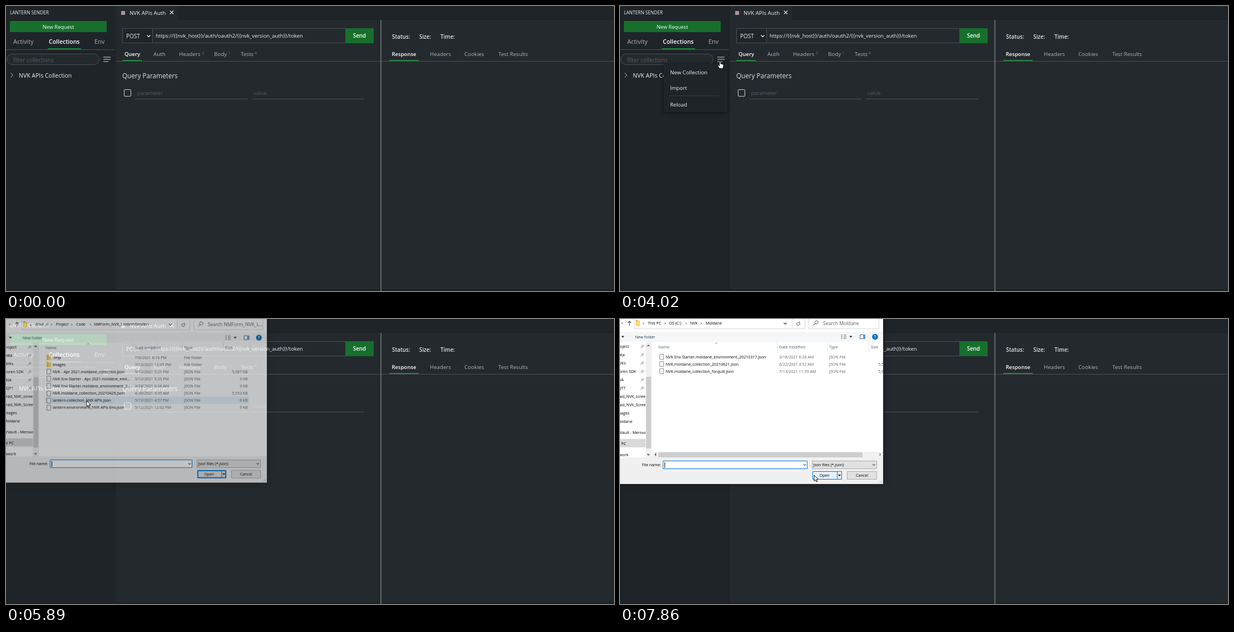
Animation of 1093x513 px, one loop 8 s. Source, as an HTML page with a canvas:

```html
<!DOCTYPE html>
<html lang="en">
<head>
<meta charset="utf-8">
<title>API client import</title>
<style>
html, body { margin: 0; width: 100%; height: 100%; overflow: hidden; background: #24292e; }
canvas { display: block; }
</style>
</head>
<body>
<canvas id="stage" width="1093" height="513"></canvas>
<script>
const LOOP = 8000, PAD = 20;
const FONT = '"Open Sans", "Noto Sans", sans-serif';
const GREEN = '#176f2c', BRIGHT = '#1f8038', LINE = '#4b5054', DIM = '#b0b4b7', LIGHT = '#f0f2f4', HINT = '#585d62';
const INK = '#000', NAVY = '#1e395b', GREY = '#606060', BLUE = '#0078d7';
const stage = document.getElementById('stage').getContext('2d');
const sheet = document.createElement('canvas');
sheet.width = 520; sheet.height = 340;
const dialog = sheet.getContext('2d');
dialog.translate(PAD, PAD);
let c = stage;

function rect(x, y, w, h, fill) {
  c.fillStyle = fill;
  c.fillRect(x, y, w, h);
}
function box(x, y, w, h, stroke, fill, r = 0) {
  c.beginPath();
  c.roundRect(x + .5, y + .5, w - 1, h - 1, r);
  if (fill) { c.fillStyle = fill; c.fill(); }
  c.lineWidth = 1;
  c.strokeStyle = stroke;
  c.stroke();
}
function clip(x, y, w, h) {
  c.save();
  c.beginPath();
  c.rect(x, y, w, h);
  c.clip();
}
// y is the vertical middle of the lowercase letters
function text(s, x, y, size, color, weight = 400, align = 'left') {
  c.font = `${weight} ${size}px ${FONT}`;
  c.textAlign = align;
  c.fillStyle = color;
  c.fillText(s, x, y + size * .36);
}
function path(d, color, width = 1, x = 0, y = 0, fill) {
  c.save();
  c.translate(x, y);
  const p = new Path2D(d);
  if (fill) { c.fillStyle = fill; c.fill(p); }
  c.strokeStyle = color;
  c.lineWidth = width;
  c.lineJoin = 'round';
  c.stroke(p);
  c.restore();
}
const down = (x, y, color, s = 3) => path(`M${-s} ${-s / 2}L0 ${s / 2}L${s} ${-s / 2}`, color, 1.2, x, y);
const right = (x, y, color, s = 1.5) => path(`M${-s / 2} ${-s}L${s / 2} 0L${-s / 2} ${s}`, color, 1, x, y);
const caret = (x, y) => path('M-2.5-1.2H2.5L0 1.5Z', '#222', .3, x, y, '#222');

function drawPage() {
  rect(0, 0, 1093, 513, '#24292e');
  rect(0, 0, 197, 513, '#1f2428');
  rect(309, 0, 784, 25, '#1f2428');
  rect(196, 0, 1, 513, '#1b1f23');
  rect(309, 24, 784, 1, '#1b1f23');
  rect(0, 510, 1093, 3, '#1d2125');

  text('LANTERN SENDER', 7, 12, 8.3, LIGHT);
  rect(7, 27, 174, 20, GREEN);
  text('New Request', 94, 37.3, 9.2, '#fff', 400, 'center');
  text('Activity', 13, 64, 11, DIM);
  text('Collections', 77, 64, 10.5, '#fff', 600);
  text('Env', 159, 64, 11, DIM);
  rect(0, 78, 196, 1, LINE);
  rect(75, 76, 60, 2, BRIGHT);
  box(1, 86, 167, 20, LINE, '#24292e', 10);
  text('filter collections', 13, 97, 9.9, HINT);
  path('M0 0H13M0 4H13M0 8H9', '#d5d8da', 1.2, 175, 92);
  right(10.5, 124.5, '#c5c8ca', 4);
  text('NVK APIs Collection', 23, 125.3, 10.5, LIGHT);

  rect(207, 9, 7, 7, '#a5979c');
  text('NVK APIs Auth', 222, 12.3, 9.75, LIGHT);
  path('M-3.2-3.2L3.2 3.2M3.2-3.2L-3.2 3.2', LIGHT, 1.2, 298, 11.5);

  box(209, 40, 55, 27, LINE, '#1f2428');
  box(263, 40, 348, 27, LINE);
  text('POST', 216, 54, 10, LIGHT);
  down(256.5, 54, LIGHT);
  text('https://{{nvk_host}}/auth/oauth2/{{nvk_version_auth}}/token', 269, 54, 9.4, LIGHT, 500);
  rect(610, 40, 51, 27, GREEN);
  text('Send', 635.5, 53.2, 9.9, '#fff', 600, 'center');

  rect(197, 99, 896, 1, LINE);
  text('Query', 213, 86.3, 9.5, '#fff', 600);
  [['Auth', 265], ['Headers', 311, 2, 352], ['Body', 374, 1, 399], ['Tests', 422, 4, 446.5]].forEach(([s, x, n, nx]) => {
    text(s, x, 86.3, 9.8, DIM);
    if (n) text(n, nx, 84.3, 8, '#2b9a48');
  });
  rect(209, 97, 35, 2, BRIGHT);
  text('Query Parameters', 209, 125.3, 11.7, '#dcdfe1');
  box(212, 150, 13, 13, '#d0d3d5', null, 1.5);
  text('parameter', 235.5, 156.5, 9.5, HINT);
  text('value', 445, 156.5, 9.5, HINT);
  rect(232, 167, 202, 1, LINE);
  rect(442, 167, 202, 1, LINE);

  rect(673, 25, 2, 488, '#63676a');
  [['Status:', 694], ['Size:', 743], ['Time:', 781]].forEach(([s, x]) => text(s, x, 55, 9.8, '#e2e5e7', 600));
  text('Response', 693.5, 86.3, 9.5, '#fff', 600);
  [['Headers', 762], ['Cookies', 824], ['Test Results', 885]].forEach(([s, x]) => text(s, x, 86.3, 9.7, DIM));
  rect(689, 97, 53, 2, BRIGHT);
}

function drawMenu(alpha) {
  c.save();
  c.globalAlpha = alpha;
  c.shadowColor = 'rgba(0,0,0,.5)';
  c.shadowBlur = 7;
  c.shadowOffsetY = 1;
  c.beginPath();
  c.roundRect(78, 104, 115, 87, 3);
  c.fillStyle = '#1f2428';
  c.fill();
  c.shadowColor = 'transparent';
  text('New Collection', 90, 119.5, 9.7, LIGHT);
  text('Import', 90, 147.3, 9.5, LIGHT);
  text('Reload', 90, 177.5, 9.5, LIGHT);
  rect(90, 161, 88, 1, '#353a3f');
  c.restore();
}

function drawTip(s, x, y, w) {
  box(x, y, w, 20, '#c8c8c8', '#fff');
  text(s, x + w / 2, y + 10, 8.9, '#555', 400, 'center');
}

// rows: name, date, size in KB; folders have no size
const HOME = {
  crumbs: [['drive_d', 50], ['Project', 88], ['Code', 125], ['NMForm_NVK_LanternSender', 157]],
  arrows: [80, 117, 151, 257], search: 'Search NMForm_NVK_L...',
  cols: [69, 232, 322, 397], sizeEnd: 438, sort: 147,
  rows: [
    ['.tmp', '7/6/2021 6:10 PM'], ['images', '7/13/2021 12:05 PM'],
    ['NVK - Apr 2021.moldane_collection.json', '5/12/2021 5:21 PM', '5,587'],
    ['NVK Env Starter - Apr 2021.moldane_envi...', '5/12/2021 5:25 PM', '3'],
    ['NVK Env Starter.moldane_environment_2...', '3/18/2021 6:26 AM', '3'],
    ['NVK.moldane_collection_20210429.json', '4/30/2021 4:35 AM', '5,553'],
    ['lantern-collection_NVK APIs.json', '5/12/2021 4:57 PM', '6'],
    ['lantern-environment_NVK APIs Env.json', '5/12/2021 12:02 PM', '5']
  ]
};
const NEXT = {
  crumbs: [['This PC', 50], ['OS (C:)', 88], ['NVK', 126], ['Moldane', 154]],
  arrows: [42, 81, 119, 146], search: 'Search Moldane',
  cols: [69, 286, 376, 451], sizeEnd: 493, sort: 173, scroll: true,
  rows: [
    ['NVK Env Starter.moldane_environment_20210317.json', '3/18/2021 6:26 AM', '3'],
    ['NVK.moldane_collection_20210621.json', '6/22/2021 3:52 AM', '5,553'],
    ['NVK.moldane_collection_forquill.json', '7/13/2021 11:59 AM', '5,612']
  ]
};
const PLACES = ['Project', 'Data', 'NVKs', 'Ivoren SDK', 'NVA', 'ZQTT', 'Erad_NVK_screens', 'Erad_NVK_Screens', 'Images', 'Moldane'];

// The sheet reaches PAD pixels past the top left corner, which shows while the window grows
function drawDialog(view, typed, mouse, loading) {
  const S = 7.1;
  c.clearRect(-PAD, -PAD, 520, 340);
  c.save();
  c.shadowColor = 'rgba(0,0,0,.35)';
  c.shadowBlur = 12;
  rect(-PAD, -PAD, 473 + PAD, 297 + PAD, '#f0f0f0');
  c.restore();
  clip(-PAD, -PAD, 473 + PAD, 297 + PAD);
  rect(-PAD, -PAD, 473 + PAD, 249 + PAD, '#fff');
  rect(-PAD, 23, 473 + PAD, 18, '#f5f6f7');

  // address bar
  box(25, -3, 285, 21, '#d9d9d9');
  box(309, -3, 24, 21, '#d9d9d9');
  box(339, -3, 127, 21, '#d9d9d9');
  down(4, 7.5, '#888', 1.5);
  path('M0 4V-4M-3-1L0-4L3-1', '#555', 1.2, 17, 8);
  rect(28, 3, 8, 10, '#ffd76e');
  rect(28, 2, 4, 2, '#e8b84a');
  if (!view.scroll) text('«', 40, 8, S, '#333');
  view.crumbs.forEach(([s, x]) => text(s, x, 7.8, S, INK));
  view.arrows.forEach(x => right(x, 8, '#444'));
  down(297, 8, '#444', 2.5);
  path('M2-2A2.8 2.8 0 1 1-1-2.6M2-4V-1.8H-.2', '#555', 1, 320.5, 8.5);
  path('M-1 1L-4.5 4.5M-1 1A3 3 0 1 1 3.5 1A3 3 0 0 1-1 1', '#666', 1, 352, 7);
  text(view.search, 365, 8, 8.6, GREY);

  // toolbar
  caret(5, 32);
  text('New folder', 27, 32, S, NAVY);
  path('M0 0H3M5 0H10M0 3H3M5 3H10M0 6H3M5 6H10', '#666', 1.2, 397, 29);
  caret(415, 32);
  box(431, 28, 10, 8, '#4a6785', '#fff');
  rect(437, 28, 4, 8, '#5b9bd0');
  c.beginPath();
  c.arc(458.5, 32, 5.2, 0, 7);
  c.fillStyle = '#0068b5';
  c.fill();
  text('?', 458.5, 32, 8, '#fff', 700, 'center');

  // places
  clip(-PAD, 41, 46 + PAD, 208);
  rect(-PAD, 216, 46 + PAD, 15, '#d9d9d9');
  PLACES.forEach((s, i) => text(s, -7, 49 + i * 15, S, INK));
  text('OurVault - Merovan', -13, 204, S, INK);
  text('This PC', -13, 224, S, INK);
  text('Network', -13, 244, S, INK);
  for (let i = 0; i < 6; i++) path('M-3 3L-1 1M-2-1L1 2M-1-.5L1-3L3-1L.5 1Z', '#777', .8, 40, 49.5 + i * 15);
  c.restore();
  rect(46, 41, 11, 208, '#f0f0f0');
  rect(47, 104, 9, 129, '#cdcdcd');
  path('M-2 1L0-1L2 1', '#444', 1.2, 51, 48);
  down(51, 244, '#444', 2);

  // file list
  ['Name', 'Date modified', 'Type', 'Size'].forEach((s, i) => {
    const x = view.cols[i];
    text(s, x, 50, S, '#4c607a');
    if (i) rect(x - 4, 41, 1, 19, '#e5e5e5');
  });
  if (!view.scroll) rect(442, 41, 1, 19, '#e5e5e5');
  path('M-2 1L0-1L2 1', '#777', 1, view.sort, 43.5);
  if (!loading) view.rows.forEach(([name, date, size], i) => {
    const y = 68 + i * 13.1;
    if (!view.scroll && mouse.x > 68 && Math.abs(mouse.y - y) < 6.55) rect(68, y - 6.5, 372, 13.1, '#e5f3fd');
    if (size) {
      box(71, Math.round(y - 5), 8, 10, '#8c8c8c', '#fff');
    } else {
      rect(71, y - 5, 8, 10, '#ffd76e');
      rect(71, y - 5, 3, 10, '#f0c456');
    }
    text(name, 82, y, S, INK);
    text(date, view.cols[1], y, S, GREY);
    text(size ? 'JSON File' : 'File folder', view.cols[2], y, S, GREY);
    if (size) text(size + ' KB', view.sizeEnd, y, S, GREY, 400, 'right');
  });
  if (view.scroll) {
    rect(58, 239, 415, 10, '#f0f0f0');
    rect(69, 240, 367, 9, '#cdcdcd');
    path('M1-2L-1 0L1 2', '#333', 1.2, 64, 244);
    right(467.5, 244, '#333', 2);
  }

  // bottom panel
  rect(-PAD, 249, 473 + PAD, 48, '#f0f0f0');
  text('File name:', 73.5, 262.5, S, INK, 400, 'right');
  box(77, 255, 260, 15, BLUE, '#fff');
  text(typed, 80, 262.5, S, INK);
  rect(80 + (typed ? c.measureText(typed).width + 1 : 0), 258, 1, 10, INK);
  down(332, 262.5, '#555', 2.3);
  box(345, 255, 117, 15, '#adadad', '#e1e1e1');
  text('Json files (*.json)', 347.5, 262.5, S, INK);
  down(456.5, 262.5, '#555', 2.3);
  const hot = mouse.x > 345 && mouse.y > 273;
  box(346, 274, 53, 15, BLUE, hot ? '#e5f1fb' : '#e1e1e1');
  if (!hot) box(347, 275, 51, 13, BLUE);
  rect(390, 275, 1, 13, BLUE);
  text('Open', 367.5, 281.5, S, INK, 400, 'center');
  caret(394.5, 281.5);
  box(408, 274, 54, 15, '#adadad', '#e1e1e1');
  text('Cancel', 435, 281.5, S, INK, 400, 'center');
  for (let i = 0; i < 3; i++) for (let j = 0; j <= i; j++) rect(470 - j * 2, 290 + i * 2, 1, 1, '#aaa');
  c.restore();
}

// eased cursor moves: start, end, steps, from, to
const MOVES = [
  [457, 660, 4, [926, 464], [260, 268]],
  [940, 1550, 10, [260, 268], [179, 99]],
  [4085, 4410, 6, [179, 99], [145, 147]],
  [6090, 6620, 9, [145, 147], [212, 262]],
  [6700, 7450, 12, [212, 262], [349, 281]]
];
function cursorAt(t) {
  let pos = MOVES[0][3];
  for (const [start, end, n, from, to] of MOVES) {
    if (t < start) break;
    const k = Math.min(n, Math.floor((t - start) / (end - start) * (n - 1) + .001) + 1) / n;
    const e = k * k * (3 - 2 * k);
    pos = from.map((v, i) => v + (to[i] - v) * e);
  }
  return { x: pos[0], y: pos[1] };
}

const ARROW = 'M0 0V10.6L2.4 8.4L4 12L5.7 11.3L4.1 7.7H7.4Z';
const HAND = 'M-1 1Q.2-1 1.3 1V5L5 5.8Q6.6 6.3 6.3 8.5L5.2 13.5H-.8L-3.8 9Q-4.3 7.3-2.7 7.4L-1 8.8Z';
const BEAM = 'M-2-6H2M0-6V6M-2 6H2';

function drawCursor(t, { x, y }) {
  if (t < 390) return;
  if (t >= 6090 && x > 77 && x < 337 && y > 255 && y < 270) return path(BEAM, '#222', 1, x, y);
  const hand = t >= 1740 && t < 5480;
  path(hand ? HAND : ARROW, '#111', 1, x + (hand ? .8 : 0), y, '#fff');
}

function draw(t) {
  const mouse = cursorAt(t);
  c = stage;
  drawPage();
  if (t >= 2280 && t < 3420) drawTip('Menu', 186, 110, 37);
  if (t >= 3420 && t < 5480) drawMenu(t < 3550 || t >= 5350 ? .5 : 1);
  if (t >= 4950 && t < 5350) drawTip('Import Collection', 152, 157, 85);
  if (t >= 5820) {
    c = dialog;
    drawDialog(t < 7650 ? HOME : NEXT, t >= 6900 && t < 7590 ? 'C:\\NVK\\Moldane' : '', mouse, t >= 7590 && t < 7720);
    c = stage;
    const alpha = [.35, .72, .93][Math.floor((t - 5820) / 65)] || 1;
    const scale = 1 - .054 * (1 - alpha);
    c.save();
    c.globalAlpha = alpha;
    c.translate(202, 133);
    c.scale(scale, scale);
    c.drawImage(sheet, -202 - PAD, -133 - PAD);
    c.restore();
  }
  drawCursor(t, mouse);
}

const began = performance.now();
function tick() {
  draw((performance.now() - began) % LOOP);
  requestAnimationFrame(tick);
}
tick();
</script>
</body>
</html>
```
